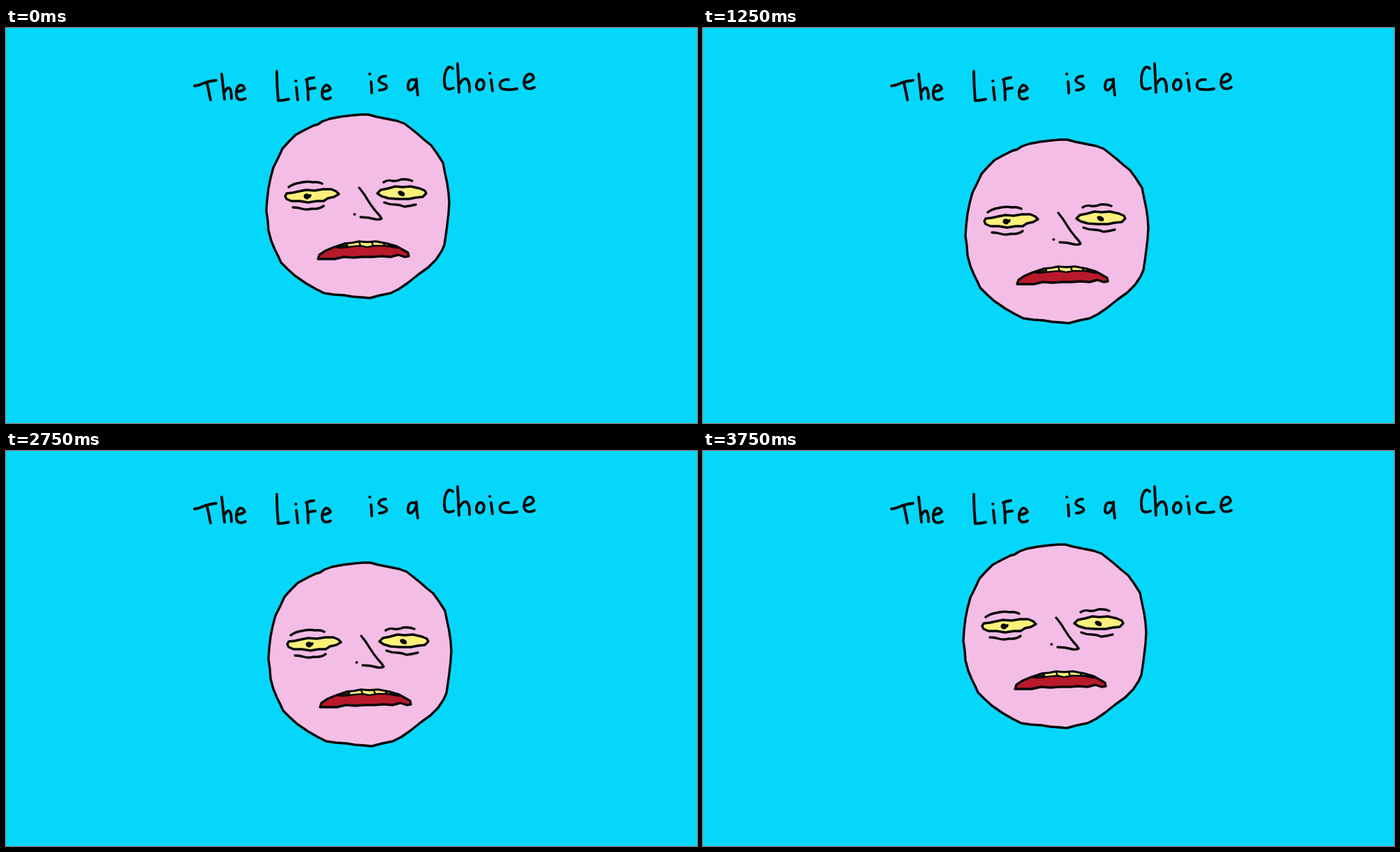
Recreate the animation shown at these times as an HTML page. Size 990x566 px, loop 4 s.

```html
<!DOCTYPE html>
<html lang="en">
<head>
<meta charset="utf-8">
<title>The Life is a choice</title>
<style>
  html, body { margin: 0; width: 100%; height: 100%; overflow: hidden; background: #05d7fb; }
  svg { display: block; width: 990px; height: 566px; }
  path { fill: none; stroke: #080808; stroke-linecap: round; stroke-linejoin: round; }
  #lettering path { stroke-width: 3.9; }
  #head path { stroke-width: 3.4; }
  #head .skin { fill: #f3bde5; }
  #head .yellow { fill: #fdf17b; }
  #head .lips { fill: #b8192b; }
  #head .ink { fill: #080808; stroke-width: 1.5; }
  #head .thin { stroke-width: 2.4; }
</style>
</head>
<body>
<svg viewBox="0 0 990 566" role="img" aria-label="The Life is a choice">
  <g id="lettering">
    <!-- The -->
    <path d="M270 83Q275 83 281 80Q290 76 301 75M288 79Q291 92 293 103"/>
    <path d="M309 66Q311 83 313 102M312 93Q317 84 320 86Q323 89 323 101"/>
    <path d="M330 91Q338 91 342 87Q340 81 335 82Q329 85 330 97Q332 106 343 101"/>
    <!-- Life -->
    <path d="M388 62Q388 83 390 104Q397 104 405 102"/>
    <path d="M416 85Q417 95 418 103M415 76h.5"/>
    <path d="M431 74Q433 88 433 103M430 74Q434 72 441 71M433 88Q438 86 443 86"/>
    <path d="M454 91Q461 91 465 87Q462 81 458 82Q452 86 453 97Q456 105 465 100"/>
    <!-- is -->
    <path d="M523 77Q524 85 524 93M521 66h.5"/>
    <path d="M544 69Q535 69 534 75Q535 78 541 80Q547 82 545 86Q541 89 535 89"/>
    <!-- a -->
    <path d="M587 75Q579 72 577 78Q574 88 579 89Q585 88 588 78M588 73Q588 85 590 96"/>
    <!-- choice -->
    <path d="M640 58Q635 53 631 60Q626 71 629 84Q632 90 641 86"/>
    <path d="M647 51Q648 72 649 92M650 80Q655 71 660 73Q665 78 664 91"/>
    <path d="M678 74Q673 79 674 85Q677 91 683 87Q687 80 683 75Q680 73 677 75"/>
    <path d="M695 74Q696 82 697 90M693 65h.5"/>
    <path d="M720 74Q711 73 708 79Q706 88 716 88Q724 89 732 87"/>
    <path d="M743 78Q752 78 756 72Q755 65 749 66Q742 69 742 80Q745 91 757 85"/>
  </g>
  <g id="head">
    <path class="skin" d="M447 138L453 134 464 130 480 127 497 125 509 124 519 124 530 127 545 130 560 133
      571 137 580 144 590 152 599 160 609 168 617 179 626 193 629 208 632 222 634 236 635 250 634 266
      632 283 630 298 628 311 624 320 616 332 605 343 591 353 576 365 563 374 551 380 536 383 521 387
      511 386 497 385 485 383 470 382 456 380 444 374 430 366 414 355 403 345 394 336 390 327 385 317
      380 305 376 290 375 276 373 262 374 247 376 230 379 215 383 200 390 186 396 173 405 163 415 153
      428 146 440 140Z"/>
    <!-- brows and bags -->
    <path d="M405 228Q412 223 420 222Q430 219 440 221Q447 220 453 223"/>
    <path d="M541 221Q547 217 553 219Q560 220 566 217Q575 216 582 219"/>
    <path d="M411 257Q418 257 424 259Q430 261 438 259Q448 260 455 255"/>
    <path d="M542 250Q549 253 557 253Q564 253 571 256Q579 255 587 253"/>
    <!-- eyes -->
    <path class="yellow" d="M400 241L402 237 411 236 420 234 430 232 442 233 454 231 466 231 473 234 477 238
      470 242 461 244 455 248 445 248 433 250 421 248 409 248 402 245Z"/>
    <path class="yellow" d="M532 237L537 232 547 230 558 227 568 228 580 227 593 230 600 233 602 237
      597 242 587 243 577 245 562 245 548 244 538 241Z"/>
    <path class="ink" d="M428 239Q431 237 433 239L437 239Q437 242 434 243Q432 246 429 244Q426 242 428 239Z"/>
    <path class="ink" d="M562 235Q565 233 568 235Q572 237 570 240Q566 241 563 238Z"/>
    <!-- nose -->
    <path d="M506 229Q513 237 518 246Q524 256 531 264Q536 269 538 273Q535 275 529 274Q519 271 508 271M499 267h.8"/>
    <!-- mouth -->
    <path class="lips" d="M447 331L449 325 458 319 470 314 485 309 496 308 506 306 517 307 530 306
      546 309 560 313 569 318 576 322 577 327 571 328 562 325 551 328 538 327 525 328 511 328
      498 329 484 328 471 331 459 331Z"/>
    <path class="yellow thin" d="M472 314L485 309 496 308 506 306 517 307 530 306 546 309 553 312
      542 312 529 312 517 314 508 312 497 313 488 314 478 315Z"/>
    <path class="thin" d="M477 313L489 311 488 314M506 307L508 312M524 307L526 312M541 309L543 312L560 315"/>
  </g>
</svg>
<script>
  const head = document.getElementById('head');
  const STEP = 250;
  const poses = [[0, 0], [0, 10], [1, 23], [3, 36], [1, 51]];
  const last = poses.length - 1;

  // The head drops through the poses and climbs back, twice every 4 s.
  function draw() {
    const step = Math.floor(performance.now() / STEP) % (2 * last);
    const [x, y] = poses[last - Math.abs(last - step)];
    head.setAttribute('transform', `translate(${x} ${y})`);
    requestAnimationFrame(draw);
  }
  draw();
</script>
</body>
</html>
```
